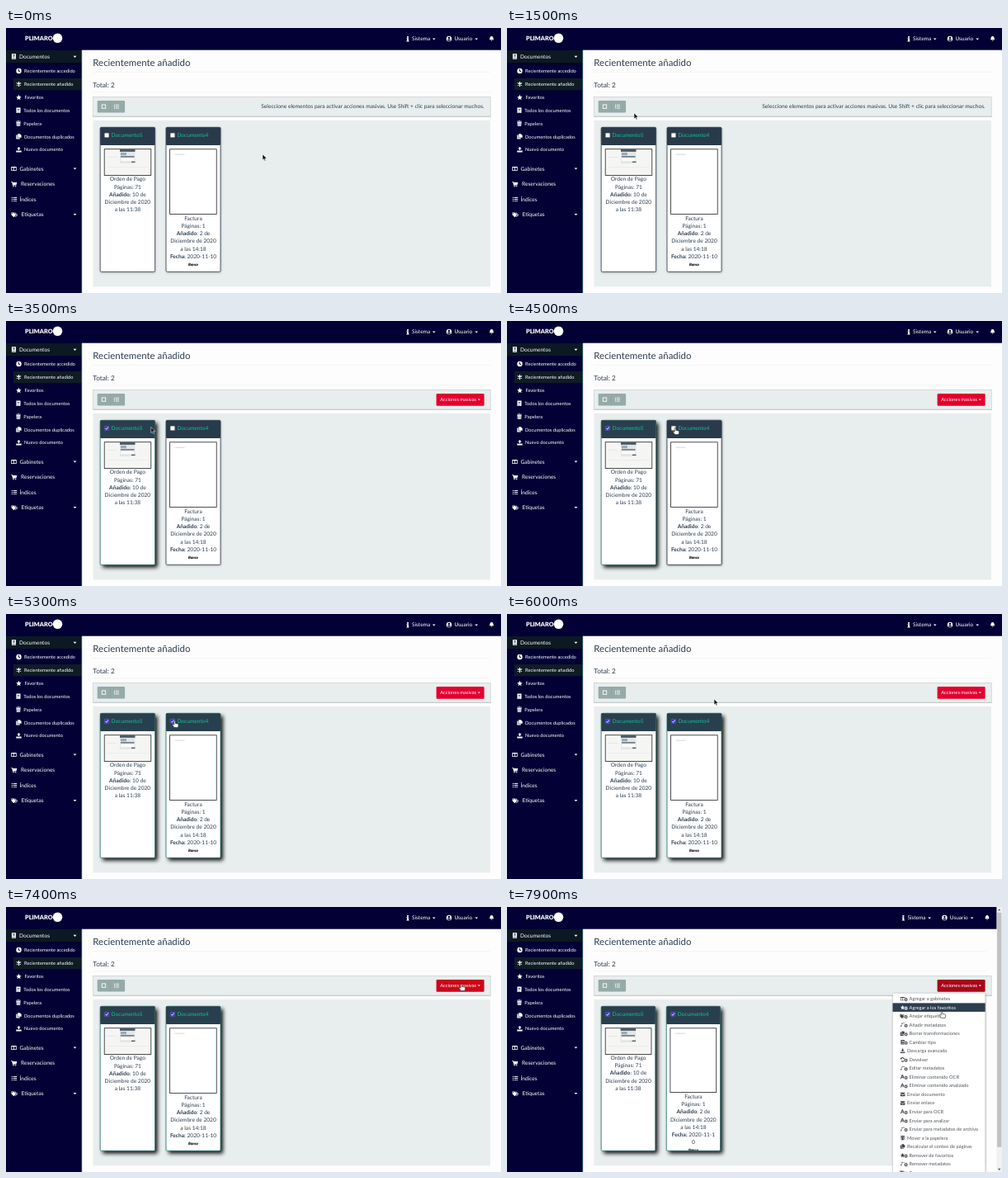
An HTML page that plays this animation: 600x321 px, repeating every 8000 ms.

```html
<!DOCTYPE html>
<html lang="es">
<head>
<meta charset="utf-8">
<title>Documentos</title>
<style>
html, body { margin: 0; width: 100%; height: 100%; overflow: hidden; background: #fefdfd; }
svg { display: block; width: 100vw; height: 100vh; }
text { font-family: Lato, sans-serif; text-rendering: geometricPrecision; white-space: pre; }
</style>
</head>
<body>
<svg id="stage" viewBox="0 0 600 321" preserveAspectRatio="none">
  <g id="base"></g>
  <g id="live"></g>
</svg>
<script>
const LOOP = 8000, STEP = 100;
const NAVY = '#020034', INK = '#2c3e50', TEAL = '#18bc9c', PANEL = '#e8eeed';

const ICONS = {
  book: 'M-4-5h8v8h-1v1h1v1h-8zM-2-3v1h4v-1zM-2-1v1h4v-1zM-3 3v1h5v-1z',
  clock: 'M-5 0a5 5 0 1 0 10 0a5 5 0 1 0-10 0zM-.8-3.5v4l2.6 2 .9-1.2-2-1.5v-3.3z',
  star: 'M0-5l1.5 3.3 3.5.4-2.6 2.5.7 3.6L0 3-3.1 4.8l.7-3.6L-5-1.3l3.5-.4z',
  trash: 'M-4.5-4.5h3l.5-.7h2l.5.7h3v1.2h-9zM-4-2.5h8l-.6 7.5h-6.8zM-2-1.2v5h.8v-5zM1.2-1.2v5h.8v-5z',
  copy: 'M-2-5h4l3 2.8V2h-7zM-5-3h2.2V3H2v2h-7z',
  upload: 'M-1.2 2v-3.5h-2.3L0-5l3.5 3.5H1.2V2zM-5 2h3v1h4v-1h3v3h-10z',
  download: 'M-1.2-5h2.4v3.5h2.3L0 2l-3.5-3.5h2.3zM-5 2h3v1h4v-1h3v3h-10z',
  columns: 'M-5-4h10v8h-10zM-3.8-1.8v4.6h3.2v-4.6zM.6-1.8v4.6h3.2v-4.6z',
  cart: 'M-5.5-4.5h2.2l.4 1.3H5.5L4.3 1.6H-1.6l.2.9H4v1H-2.4L-4.2-3.4h-1.3zM-2.4 4.3a1 1 0 1 0 2 0a1 1 0 1 0-2 0zM2 4.3a1 1 0 1 0 2 0a1 1 0 1 0-2 0z',
  list: [-4, -.8, 2.4].map(y => `M-5 ${y}h1.8v1.7h-1.8zM-2 ${y + .2}h7v1.3h-7z`).join(''),
  tags: 'M-6-4h4.5L3 .5-1.5 5-6 .5zM-4.8-2.6h1.4v1.4h-1.4zM-.2-4h1.5L6 .6 1.8 4.8 1 4 4.4.6z',
  info: 'M-1.5-5h3v2.6h-3zM-2.3-1.5h3.8v5h.9v1.5h-4.8v-1.5h.9v-3.5h-.8z',
  user: 'M-5 0a5 5 0 1 0 10 0a5 5 0 1 0-10 0zM-1.9-1.5a1.9 1.9 0 1 0 3.8 0a1.9 1.9 0 1 0-3.8 0zM-3.2 2.6c.5-1.2 1.6-1.5 3.2-1.5s2.7.3 3.2 1.5c-1.5 1.8-4.9 1.8-6.4 0z',
  bell: 'M0-5c3 .3 3.5 2.5 3.6 4.3.1 1.6.6 2.2 1.2 3H-4.8c.6-.8 1.1-1.4 1.2-3C-3.5-2.5-3-4.7 0-5zM-1.4 3.2h2.8a1.4 1.6 0 0 1-2.8 0z',
  mail: 'M-5-4h10v1.2L0 .8-5-2.8zM-5-1.4L0 2.2 5-1.4V4h-10z',
  letter: 'M-5 4L-1.5-5h2L4 4H2L1.1 1.6h-3.3L-3 4zM-1.6 0H.6L-.5-3z',
  pen: 'M-5 5l.6-3L2.5-5 5-2.5-2-4.4l0 6.9z',
  undo: 'M-5-4.5v4h4l-1.5-1.4a3 3 0 1 1 .2 4.2l-1.2 1.3a4.8 4.8 0 1 0-.1-6.8z',
  caret: 'M-3-1.6h6L0 1.7z'
};

const rect = (x, y, w, h, fill, extra = '') =>
  `<rect x="${x}" y="${y}" width="${w}" height="${h}" fill="${fill}" ${extra}/>`;
const text = (x, y, size, fill, str, extra = '') =>
  `<text x="${x}" y="${y}" font-size="${size}" fill="${fill}" ${extra}>${str}</text>`;
const icon = (name, x, y, fill = '#fff', k = .64) =>
  `<path transform="translate(${x} ${y}) scale(${k})" fill="${fill}" fill-rule="evenodd" d="${ICONS[name]}"/>`;
const burst = (x, y) =>
  `<path transform="translate(${x} ${y})" d="M0-3V3M-2.6-1.5L2.6 1.5M-2.6 1.5L2.6-1.5" stroke="#fff" stroke-width="1.1"/>`;
const bold = s => `<tspan font-weight="700">${s}</tspan>`;
const clamp = v => Math.max(0, Math.min(1, v));
const mix = (a, b, k) => a + (b - a) * k;

// Sidebar rows: icon, icon x, centre y, label x, label, size
const SIDE = [
  ['book', 9.5, 34.5, 16, 'Documentos', 6.6],
  ['clock', 15.5, 52, 22, 'Recientemente accedido', 5.78],
  ['', 15.5, 68, 22, 'Recientemente añadido', 5.78],
  ['star', 15.5, 84, 22.5, 'Favoritos', 5.78],
  ['book', 15, 99.8, 21.3, 'Todos los documentos', 5.78],
  ['trash', 15, 115.6, 21.3, 'Papelera', 5.78],
  ['copy', 15.5, 131.4, 22, 'Documentos duplicados', 5.78],
  ['upload', 15.5, 147.2, 22, 'Nuevo documento', 5.78],
  ['columns', 9.5, 170.5, 16.5, 'Gabinetes', 6.6],
  ['cart', 9.8, 189, 18, 'Reservaciones', 6.6],
  ['list', 10, 207.5, 16.5, 'Índices', 6.6],
  ['tags', 10.3, 226, 18.5, 'Etiquetas', 6.6]
];

// Menu rows: icon, badge (1) or plain (0), label
const MENU = [
  ['columns', 1, 'Agregar a gabinetes'], ['star', 1, 'Agregar a los favoritos'],
  ['tags', 1, 'Anejar etiquetas'], ['pen', 1, 'Añadir metadatos'],
  ['copy', 1, 'Borrar transformaciones'], ['book', 1, 'Cambiar tipo'],
  ['download', 0, 'Descarga avanzada'], ['undo', 1, 'Devolver'],
  ['pen', 1, 'Editar metadatos'], ['letter', 1, 'Eliminar contenido OCR'],
  ['letter', 1, 'Eliminar contenido analizado'], ['mail', 0, 'Enviar documento'],
  ['mail', 0, 'Enviar enlace'], ['letter', 1, 'Enviar para OCR'],
  ['letter', 1, 'Enviar para analizar'], ['pen', 1, 'Enviar para metadatos de archivo'],
  ['trash', 0, 'Mover a la papelera'], ['copy', 0, 'Recalcular el conteo de páginas'],
  ['star', 1, 'Remover de favoritos'], ['pen', 1, 'Remover metadatos'],
  ['tags', 1, 'Renovar']
];

function drawBase() {
  let s = rect(0, 0, 92, 321, NAVY) + rect(0, 0, 600, 26.7, NAVY);
  s += rect(0, 27, 92, 15.3, '#0c1822') + rect(9, 61, 83, 14.3, '#101c24');
  s += rect(91.5, 27, .7, 294, '#2f7f7c');
  s += text(23, 15.2, 7.3, '#fff', 'PLIMARO', 'font-weight="900"') + '<circle cx="62.5" cy="12.3" r="5.8" fill="#fff"/>';
  for (const [name, ix, y, x, label, size] of SIDE) {
    s += name ? icon(name, ix, y) : burst(ix, y);
    s += text(x, y + (size > 6 ? 2.4 : 2.2), size, '#fff', label);
  }
  for (const y of [34.8, 170.5, 226]) s += icon('caret', 83.5, y, '#fff', .65);
  s += text(105.3, 45.7, 11.45, INK, 'Recientemente añadido') + text(105.3, 71.6, 8.25, INK, 'Total: 2');
  s += rect(105.5, 107, 482.4, .9, '#c3c9c8');
  s += rect(105.6, 83.6, 481.6, 23.4, PANEL, 'stroke="#bfc8c6" stroke-width=".6"');
  s += rect(110.7, 88, 33.4, 14.4, '#95aba7', 'rx="1.2"') + rect(126.2, 88, .5, 14.4, '#8b9f9b');
  s += rect(116.3, 92.9, 4.4, 4.4, 'none', 'stroke="#fff" stroke-width=".9"') + icon('list', 134, 95.1, '#fff', .6);
  return s;
}

function drawHeader(shift) {
  return `<g transform="translate(${shift} 0)">`
    + icon('info', 487, 13.2) + text(492, 15.4, 6.5, '#fff', 'Sistema') + icon('caret', 518.7, 13.4, '#fff', .62)
    + icon('user', 537, 13) + text(543.4, 15.4, 6.5, '#fff', 'Usuario') + icon('caret', 570.2, 13.4, '#fff', .62)
    + icon('bell', 588.6, 12.8, '#fff', .58) + '</g>';
}

function drawShadow(x, w, level) {
  const looks = [[.4, 1, 1.5, .3], [.4, .5, 1.7, .7], [3, 3.2, 2.7, .95]];
  const i = Math.min(1, Math.floor(level)), k = level - i;
  const [dx, dy, blur, op] = looks[i].map((v, j) => mix(v, looks[i + 1][j], k));
  return rect(x + dx, 120.3 + dy, w, 175, '#000', `opacity="${op}" style="filter:blur(${blur}px)"`);
}

function drawPreview(x, w) {
  const c = x + w / 2;
  return rect(x, 146.7, w, 31.8, '#f5f6f4', 'stroke="#222" stroke-width=".8"')
    + rect(c - 9.5, 147.2, 18.5, 2.6, '#3f4f5c') + rect(c - 9.5, 150, 18.5, 14, '#e3e6e6')
    + rect(c - 8.5, 151, 7, 3.2, '#9aa9b4') + rect(c - 8.5, 155.2, 16.5, 1.3, '#56636e')
    + rect(c - 8.5, 157.8, 16.5, 3.4, '#fafafa') + rect(c + 4.5, 161.6, 4.5, 1.4, '#55616b')
    + rect(c - 25, 156, 12, .5, '#d5d8d7') + rect(c - 25, 168, 50, .5, '#dfe1e0');
}

function drawCard(x, w, name, checked, level, inner, lines, top) {
  const c = x + w / 2, on = level > 1.2;
  let s = drawShadow(x, w, level);
  s += rect(x, 120.3, w, 175, '#fff', `rx="1.5" stroke="${on ? '#28756f' : INK}" stroke-width=".8"`);
  s += rect(x, 120.3, w, 21.6, on ? '#28404e' : '#293a4b', 'rx="1.2"');
  s += rect(x + 5.2, 127.2, 5.4, 5.4, checked ? '#3a38d6' : '#fff', 'rx=".8" stroke="#777" stroke-width=".4"');
  if (checked) s += `<path d="M${x + 6.3} 130l1.2 1.3 2.2-2.9" fill="none" stroke="#fff" stroke-width=".9"/>`;
  s += text(x + 13.4, 132.1, 6.6, TEAL, name) + inner;
  lines.forEach((line, i) =>
    s += text(c, top + i * 9.2, 6.62, INK, line, 'text-anchor="middle"'));
  return s;
}

function drawCards(t, narrow) {
  const w1 = narrow ? 65.6 : 66.4, x2 = narrow ? 193.3 : 194, w2 = narrow ? 65.2 : 66;
  const up = narrow ? .8 : 0, c2 = x2 + w2 / 2;
  const ramp = at => clamp((t - at + STEP) / 200);
  const right = narrow ? 580.5 : 587;
  let s = rect(105.5, 53.2, right - 105.5, .5, '#e6eaea') + rect(105.5, 77.6, right - 105.5, .5, '#e6eaea');
  s += rect(105.5, 111.8, right - 105.5, 201.6, PANEL);
  s += drawCard(114.2, w1, 'Documento5', t >= 2600, ramp(2000) + ramp(2600),
    drawPreview(119.2, w1 - 9.8),
    ['Orden de Pago', 'Páginas: 71', bold('Añadido') + ': 10 de', 'Diciembre de 2020', 'a las 11:38'], 185.4 - up / 2);

  const sheet = rect(x2 + 4.6, 146.8, w2 - 9.4, 78.6 - up, '#fff', 'stroke="#222" stroke-width=".8"')
    + rect(x2 + 10.5, 152.8, 12, .6, '#bbb');
  const date = narrow ? [bold('Fecha:') + ' 2020-11-1', '0'] : [bold('Fecha:') + ' 2020-11-10'];
  s += drawCard(x2, w2, 'Documento4', t >= 5200, ramp(3800) + ramp(5200), sheet,
    ['Factura', 'Páginas: 1', bold('Añadido') + ': 2 de', 'Diciembre de 2020', 'a las 14:18', ...date], 232.7 - up);
  const clip = `<clipPath id="cut"><rect x="${x2}" y="280" width="${w2}" height="14.9"/></clipPath>`;
  s += clip + text(c2, narrow ? 296 : 288, 4.5, '#000', 'Banco',
    'text-anchor="middle" font-weight="900" font-style="italic" clip-path="url(#cut)"');
  return s;
}

function drawAction(t) {
  if (t < 2600) {
    return text(579.6, 96.6, 6.65, INK,
      'Seleccione elementos para activar acciones masivas. Use Shift + clic para seleccionar muchos.', 'text-anchor="end"');
  }
  const fill = t >= 7700 ? '#a80719' : t >= 6800 ? '#cb0719' : '#e3002f';
  return rect(521.6, 88, 58, 14.8, fill, 'rx="1.3"')
    + text(526.2, 97.2, 5.78, '#fff', 'Acciones masivas') + icon('caret', 573.3, 95.4, '#fff', .55);
}

function drawMenu(picked) {
  let s = rect(468, 105, 112, 225, '#000', 'opacity=".3" style="filter:blur(1.5px)"');
  s += rect(467.5, 104.3, 112.2, 225, '#fff', 'rx="1" stroke="#c4c8c8" stroke-width=".5"');
  MENU.forEach(([name, badge, label], i) => {
    const y = 111.1 + i * 10.53, hot = i === picked;
    const ink = hot ? '#fff' : '#3c4045', back = hot ? INK : '#fff';
    if (hot) s += rect(467.5, y - 5.25, 112.2, 10.5, INK);
    s += icon(name, 479.6, y, ink, .55);
    if (badge) {
      s += `<circle cx="483.6" cy="${y + 1}" r="2.3" fill="${ink}" stroke="${back}" stroke-width=".7"/>`
        + rect(482.5, y + .7, 2.2, .6, back) + rect(483.3, y - .1, .6, 2.2, back);
    }
    s += text(badge ? 487.6 : 485, y + 2, 5.75, hot ? '#fff' : '#51565b', label);
  });
  return s;
}

const drawScrollbar = () => rect(593.4, 0, 6.6, 321, '#f1f1f1') + rect(594.1, 6.8, 5.2, 284, '#c1c1c1')
  + '<path d="M595 4.3h3.4l-1.7-2.1zM595 316.8h3.4l-1.7 2.1z" fill="#555"/>';

// Pointer keys: time, x, y
const PATH = [
  [0, 311, 153], [700, 311, 153], [800, 306, 150], [1100, 245, 121], [1500, 154, 103],
  [1700, 138, 108], [2100, 122, 125], [2400, 121, 126], [2800, 121, 126], [3000, 130, 127],
  [3700, 194, 129], [3900, 203, 129], [4200, 203, 129], [4500, 204, 129], [4900, 204, 129],
  [5000, 204.4, 129], [5700, 204.4, 129], [5800, 215, 122], [6000, 251, 103], [6600, 437, 91],
  [6700, 470, 92], [7000, 550, 93.5], [7400, 552, 93], [7700, 552, 93], [7800, 541, 109], [7900, 527, 126]
];

function pointerAt(t) {
  const i = PATH.findIndex(k => k[0] > t);
  if (i < 0) return PATH[PATH.length - 1].slice(1);
  const [a, b] = [PATH[i - 1], PATH[i]], k = (t - a[0]) / (b[0] - a[0]);
  return [mix(a[1], b[1], k), mix(a[2], b[2], k)];
}

function drawPointer(t) {
  const [x, y] = pointerAt(t);
  const onCard = y > 124 && y < 134 && ((x > 118 && x < 167) || (x > 198 && x < 246));
  const shape = onCard || x > 521
    ? '<path d="M-.8.7q.8-1 1.6 0v2.8l3 .6q1 .3.9 1.3l-.5 3H-.6L-2.8 5.3q0-1 1-.8l1 .8z" fill="#fff" stroke="#222" stroke-width=".6" stroke-linejoin="round"/>'
    : '<path d="M0 0v7l1.6-1.5 1.1 2.6 1.2-.5-1.1-2.5h2.3z" fill="#111" stroke="#fff" stroke-width=".5"/>';
  return `<g transform="translate(${x} ${y})">${shape}</g>`;
}

const live = document.getElementById('live');
let shown = -1;
document.getElementById('base').innerHTML = drawBase();

function render(now) {
  const t = Math.floor((now % LOOP) / STEP) * STEP;
  if (t !== shown) {
    const open = t >= 7700;
    shown = t;
    live.innerHTML = drawHeader(open ? -6.6 : 0) + drawCards(t, open) + drawAction(t)
      + (open ? drawMenu((t - 7800) / STEP) + drawScrollbar() : '') + drawPointer(t);
  }
}

function tick() {
  render(performance.now());
  requestAnimationFrame(tick);
}
tick();
</script>
</body>
</html>
```
